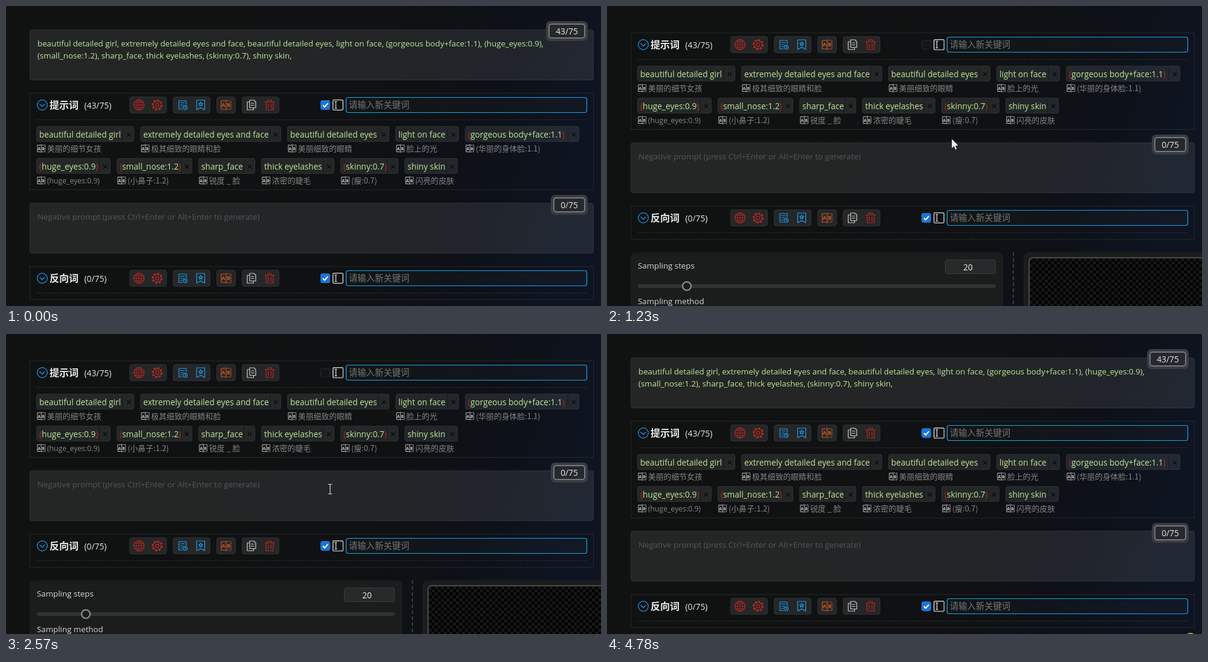
Write an HTML page that moves like this. It is 984 px wide and 497 px high and loops after 5.11 s.

```html
<!DOCTYPE html>
<html lang="zh-CN">
<head>
<meta charset="utf-8">
<title>Prompt panel</title>
<style>
html, body { margin: 0; width: 100%; height: 100%; overflow: hidden; background: #101112; }
svg { display: block; }
text { font: 13.3px "Open Sans", "Noto Sans", "Noto Sans CJK SC", "Noto Sans CJK", sans-serif; fill: #d8d8d8; white-space: pre; }
.cjk { font-family: "Noto Sans CJK SC", "Noto Sans CJK", sans-serif; }
.title { font-size: 16px; font-weight: 700; fill: #ececec; }
.count { font-size: 13.8px; fill: #e8e8e8; }
.hint { font-size: 14.3px; fill: #777; }
.green { fill: #bde897; }
.tag { font-size: 13.65px; }
.pill { font-size: 13.65px; fill: #ededed; }
.sub { font-size: 12.8px; fill: #858585; }
.latin { font-size: 12.2px; }
.ab { font-size: 8.5px; font-weight: 700; fill: currentColor; stroke: none; text-anchor: middle; }
.icon { fill: none; stroke: currentColor; stroke-width: 1.2; stroke-linejoin: round; stroke-linecap: round; }
.field { fill: #fff; fill-opacity: .085; stroke: #fff; stroke-opacity: .09; }
.btn { fill: #fff; fill-opacity: .09; stroke: #fff; stroke-opacity: .09; }
.run, .step { animation: 5110ms linear infinite; }
.step { animation-timing-function: step-end; }
.grow { transform-origin: 539px 20px; }
</style>
</head>
<body>
<script>
const LOOP = 5110;
// moments when each prompt box is hidden and shown again
const HIDE1 = 1030, SHOW1 = 3200, HIDE2 = 1830, SHOW2 = 2500;
const RED = '#c4271f', BLUE = '#1d9bf0', ORANGE = '#cf5a24', PALE = '#cfcfcf';

const rules = [];
function keys(name, prop, list) {
  const all = [[0, list[0][1]], ...list, [LOOP, list[list.length - 1][1]]];
  rules.push(`@keyframes ${name}{${all.map(([ms, v]) =>
    `${(ms / LOOP * 100).toFixed(3)}%{${prop}:${v}}`).join('')}}`);
}
const during = (name, prop, off, on, spans) =>
  keys(name, prop, [[0, off], ...spans.flatMap(([a, b]) => [[a, on], [b, off]])]);

during('gone1', 'opacity', 1, 0, [[HIDE1, SHOW1]]);
during('gone2', 'opacity', 1, 0, [[HIDE2, SHOW2]]);
during('shift1', 'transform', 'translateY(0)', 'translateY(-100px)', [[HIDE1, SHOW1]]);
during('shift2', 'transform', 'translateY(0)', 'translateY(-100px)', [[HIDE2, SHOW2]]);
during('grow1', 'transform', 'scale(1)', 'scale(1.2)', [[530, HIDE1], [3040, SHOW1]]);
during('grow2', 'transform', 'scale(1)', 'scale(1.2)', [[1560, HIDE2], [2380, SHOW2]]);
keys('tip1', 'opacity', [[620, 0], [760, 1], [890, 1], [960, .18], [1020, 0]]);
keys('tip2', 'opacity', [[1660, 0], [1740, 1], [1790, 1], [1900, .06], [1960, 0]]);
during('arrow', 'opacity', 0, 1, [[70, 510], [1110, 1540], [1840, 2370], [2860, 3030], [3450, 4290]]);
during('hand', 'opacity', 0, 1, [[510, 1110], [1540, 1840], [2370, SHOW2], [3030, SHOW1]]);
during('beam', 'opacity', 0, 1, [[SHOW2, 2860], [SHOW1, 3450]]);
during('dot', 'opacity', 0, 1, [[4780, LOOP]]);
keys('path', 'transform', [
  [70, 978, 446], [200, 850, 385], [400, 610, 215], [540, 534, 167], [1060, 534, 167],
  [1230, 570, 219], [1430, 550, 350], [1600, 533, 350], [1800, 533, 350], [1900, 550, 342],
  [2160, 556, 318], [2400, 536, 257], [2720, 536, 257], [2900, 540, 150], [3060, 533, 65],
  [3330, 533, 64], [3540, 740, 265], [3760, 980, 464], [3900, 979, 467], [4250, 978, 496]
].map(([ms, x, y]) => [ms, `translate(${x}px,${y}px)`]));

const rect = (x, y, w, h, r, more = '') =>
  `<rect x="${x}" y="${y}" width="${w}" height="${h}" rx="${r}" ${more}/>`;
const text = (x, y, s, cls = '', more = '') => `<text x="${x}" y="${y}" class="${cls}" ${more}>${s}</text>`;
const path = (d, more = '') => `<path d="${d}" ${more}/>`;
const circle = (x, y, r, more = '') => `<circle cx="${x}" cy="${y}" r="${r}" ${more}/>`;
const run = (name, body, cls = 'step') => `<g class="${cls}" style="animation-name:${name}">${body}</g>`;
const at = (x, y, body) => `<g transform="translate(${x} ${y})">${body}</g>`;

const icons = {
  globe: circle(0, 0, 8.3) + path('M-8.3 0H8.3M0-8.3V8.3M-7-4.3H7M-7 4.3H7', 'stroke-width=".8"') +
    '<ellipse rx="4.2" ry="8.3" stroke-width=".8"/>',
  gear: circle(0, 0, 2.8) + circle(0, 0, 6.6) + circle(0, 0, 8, 'stroke-width="2.2" stroke-linecap="butt" stroke-dasharray="3.1 3.18"'),
  doc: path('M6-1V-7H-6V7H0M-3.2-3.5H3.2M-3.2 0H1M-3.2 3.5H-1') + circle(4.3, 4.2, 3.3) + path('M4.3 2.6V4.4H5.6'),
  mark: path('M-6.6-8H6.6V8L0 4.4L-6.6 8Z') + path('M0-4.8L1 -2.6L3.2-2.3L1.6-.8L2 1.4L0 .4L-2 1.4L-1.6-.8L-3.2-2.3L-1-2.6Z'),
  ab: path('M-1.5-7H-8V7H-1.5M0-8.5V8.5') + path('M2-7H8V7H2', 'stroke-dasharray="2 2"') +
    text(-4.3, 3.2, 'A', 'ab') + text(4.2, 3.2, 'B', 'ab'),
  copy: path('M-3-8H4L7-5V4.5H-3ZM-4-5H-7V8H3.5V5M-.5-3H4M-.5 .5H4'),
  bin: path('M-8-5H8M-3-5V-8H3V-5M-6.2-5L-5.6 8H5.6L6.2-5M-2.3-1.8V5M2.3-1.8V5')
};
const icon = (name, x, y, color, size = 1) =>
  `<g class="icon" color="${color}" transform="translate(${x} ${y}) scale(${size})">${icons[name]}</g>`;

function badge(x, y, label) {
  return rect(x, y, 962 - x, 33, 7, 'fill="#3a3c40"') +
    rect(x + 5, y + 5, 952 - x, 23, 4, 'fill="#25282c" stroke="#74777b" stroke-width="2"') +
    text((x + 962) / 2, y + 22, label, 'count', 'text-anchor="middle"');
}

function header(title, count, height, n) {
  const groups = [[204, 62], [276, 62], [348, 32], [390, 62]];
  const tools = [['globe', 220, RED], ['gear', 250, RED], ['doc', 292, BLUE], ['mark', 322, BLUE],
    ['ab', 364, ORANGE], ['copy', 406, PALE], ['bin', 436, RED]];
  return rect(39.5, .5, 932, height, 0, 'fill="none" stroke="#fff" stroke-opacity=".09"') +
    `<g class="icon" color="${BLUE}">${circle(60, 20, 8.3) + path('M56 18.5L60 22.5L64 18.5')}</g>` +
    text(72, 26.3, title, 'cjk title') + text(129.5, 26, count, 'count') +
    groups.map(([x, w]) => rect(x + .5, 6.5, w - 1, 27, 4, 'class="btn"')).join('') +
    tools.map(([name, x, c]) => icon(name, x, 20, c)).join('') +
    run('grow' + n,
      rect(520.5, 12.5, 15, 15, 3.5, 'fill="#141516" stroke="#2b2c2e"') +
      run('gone' + n, rect(520, 12, 16, 16, 3.5, 'fill="#1c74d6"') +
        path('M524 20.2L527 23.2L532.3 17.2', 'fill="none" stroke="#fff" stroke-width="2"')) +
      rect(540.7, 11.7, 16.6, 16.6, 1.5, 'fill="none" stroke="#dcdcdc" stroke-width="1.3"') +
      path('M543.5 14.5H547.5M543.5 25.5H547.5M545.5 14.5V25.5', 'stroke="#dcdcdc" stroke-width="1.2"'),
      'step grow') +
    rect(562.5, 7.5, 398, 25, 3.5, 'fill="#fff" fill-opacity=".02" stroke="#1ba4ee" stroke-width="1.2"') +
    text(567, 25.4, '请输入新关键词', 'cjk hint') +
    path('M50 44.5H961', 'stroke="#fff" stroke-opacity=".13" stroke-dasharray="3 2"');
}

function tag(x, end, y, word, sub) {
  const label = word.replace(/^\((.*)\)$/, '<tspan fill="#b3291c">(</tspan>$1<tspan fill="#b3291c">)</tspan>');
  const cls = /[\u4e00-\u9fff]/.test(sub) ? 'cjk sub' : 'sub latin';
  const c = end - 9;
  return rect(x + .5, y + .5, end - x - 1, 25, 3, 'class="btn"') +
    path(`M${end - 18.5} ${y + 1}v24`, 'stroke="#000" stroke-opacity=".35"') +
    path(`M${c - 3} ${y + 11}l6 6m0 -6l-6 6`, 'stroke="#08090a" stroke-width="1.3"') +
    text(x + 5, y + 18.8, label, 'tag green') +
    icon('ab', x + 8.3, y + 37, '#c4c4c4', .8) + text(x + 18, y + 41.6, sub, cls);
}

const tags = [
  [50, 212, 55, 'beautiful detailed girl', '美丽的细节女孩'],
  [222, 455, 55, 'extremely detailed eyes and face', '极其细致的眼睛和脸'],
  [465, 634, 55, 'beautiful detailed eyes', '美丽细致的眼睛'],
  [644, 749, 55, 'light on face', '脸上的光'],
  [759, 948, 55, '(gorgeous body+face:1.1)', '(华丽的身体脸:1.1)'],
  [50, 173, 108, '(huge_eyes:0.9)', '(huge_eyes:0.9)'],
  [183, 308, 108, '(small_nose:1.2)', '(小鼻子:1.2)'],
  [318, 412, 108, 'sharp_face', '锐度 _ 脸'],
  [422, 543, 108, 'thick eyelashes', '浓密的睫毛'],
  [553, 649, 108, '(skinny:0.7)', '(瘦:0.7)'],
  [659, 747, 108, 'shiny skin', '闪亮的皮肤']
];

function radio(x, end, y, label, on) {
  return rect(x + .5, y + .5, end - x - 1, 30, 4, 'fill="#28292a" stroke="#38393a"') +
    circle(x + 13, y + 16, 7.5, on ? 'fill="#1f7fd6"' : 'fill="#343536" stroke="#454647"') +
    (on ? circle(x + 13, y + 16, 2.8, 'fill="#fff"') : '') + text(x + 29, y + 21, label, 'pill');
}
const rows = [
  [103, [51, 127, 'Euler a'], [135, 202, 'Euler'], [210, 276, 'LMS'], [284, 352, 'Heun'],
    [360, 431, 'DPM2'], [439, 522, 'DPM2 a'], [530, 643, 'DPM++ 2S a']],
  [142, [51, 160, 'DPM++ 2M'], [168, 280, 'DPM++ SDE'], [288, 397, 'DPM fast'],
    [405, 526, 'DPM adaptive'], [534, 643, 'LMS Karras']],
  [181, [51, 183, ''], [191, 323, ''], [331, 486, ''], [494, 643, '']]
];

const settings =
  rect(39, 0, 616, 300, 8, 'fill="#1b1c1c"') +
  text(51, 27, 'Sampling steps') +
  rect(559.5, 12.5, 83, 23, 3, 'fill="#28292a" stroke="#3a3b3c"') +
  text(597, 30, '20', 'pill', 'text-anchor="middle"') +
  rect(51, 53, 592, 6, 3, 'fill="#323334"') +
  circle(132, 56, 7, 'fill="#1b1c1c" stroke="#92968f" stroke-width="2"') +
  text(51, 86, 'Sampling method') +
  rows.map(([y, ...items]) => items.map(([a, b, s]) => radio(a, b, y, s, s === 'Euler a')).join('')).join('') +
  path('M672 0V300', 'stroke="#3b3c3d" stroke-width="2" stroke-dasharray="6 4"') +
  rect(689, 0, 320, 300, 8, 'fill="#1b1c1d"') +
  rect(698, 9, 320, 300, 6, 'fill="url(#check)" stroke="#484a4c" stroke-width="2"');

const tooltip = y => rect(484, y, 115, 22, 4, 'fill="#202122"') + text(492, y + 16.3, '隐藏默认输入框', 'cjk', 'style="font-size:14.1px"');

const arrow = path('M0 0V16.5L3.8 13L6.3 18.6L9 17.4L6.5 12H11.6Z', 'fill="#fff" stroke="#111" stroke-width=".8"');
const hand = path('M-2 1.5Q0-1 2 1.5V8Q4 6.5 5 8.6Q7 7.6 7.6 9.6Q9.6 9 9.8 11V15Q9.6 18 7.6 20V22H-1.6V20Q-4 17-7.4 12.6Q-8 10-5.4 10.2L-2 13Z',
  'fill="#fff" stroke="#222" stroke-width=".8"');
const beam = path('M-3.5-8H-1L0-7L1-8H3.5M-3.5 8H-1L0 7L1 8H3.5M0-7V7', 'fill="none" stroke="#d8d8d8" stroke-width="1.2"');

const promptBox = rect(39.5, 39.5, 932, 83, 4, 'class="field"') +
  text(52, 67, 'beautiful detailed girl, extremely detailed eyes and face, beautiful detailed eyes, light on face, (gorgeous body+face:1.1), (huge_eyes:0.9),', 'green') +
  text(52, 87, '(small_nose:1.2), sharp_face, thick eyelashes, (skinny:0.7), shiny skin,', 'green') +
  badge(893, 25, '43/75');
const negativeBox = rect(39.5, 326.5, 932, 83, 4, 'class="field"') +
  text(52, 354, 'Negative prompt (press Ctrl+Enter or Alt+Enter to generate)', '', 'style="fill:#545658"') +
  badge(901, 313, '0/75');

const scene = `<svg width="984" height="497" viewBox="0 0 984 497">
<defs>
  <linearGradient id="sky" x2="1" y2=".12">
    <stop offset="0" stop-color="#101212"/><stop offset=".65" stop-color="#0f1112"/>
    <stop offset=".87" stop-color="#0d1118"/><stop offset="1" stop-color="#0e1420"/>
  </linearGradient>
  <pattern id="check" width="10" height="10" patternUnits="userSpaceOnUse" x="699" y="10">
    <rect width="10" height="10" fill="#020202"/><path d="M0 0h5v5h-5zM5 5h5v5h-5z" fill="#171717"/>
  </pattern>
</defs>
${rect(0, 0, 984, 497, 0, 'fill="url(#sky)"')}
${run('gone1', promptBox)}
${run('shift1',
  at(0, 144, header('提示词', '(43/75)', 160, 1) + tags.map(t => tag(...t)).join('')) +
  run('gone2', negativeBox) +
  run('shift2', at(0, 431, header('反向词', '(0/75)', 55, 2)) + at(0, 508, settings)))}
${run('tip1', tooltip(186), 'run')}
${run('tip2', tooltip(374), 'run')}
${run('dot', circle(965, 505, 10, 'fill="#b5ad1e"'))}
${run('path', run('arrow', arrow) + run('hand', hand) + run('beam', beam), 'run')}
</svg>`;

const style = document.createElement('style');
style.textContent = rules.join('\n');
document.head.append(style);
document.body.innerHTML = scene;
</script>
</body>
</html>
```
